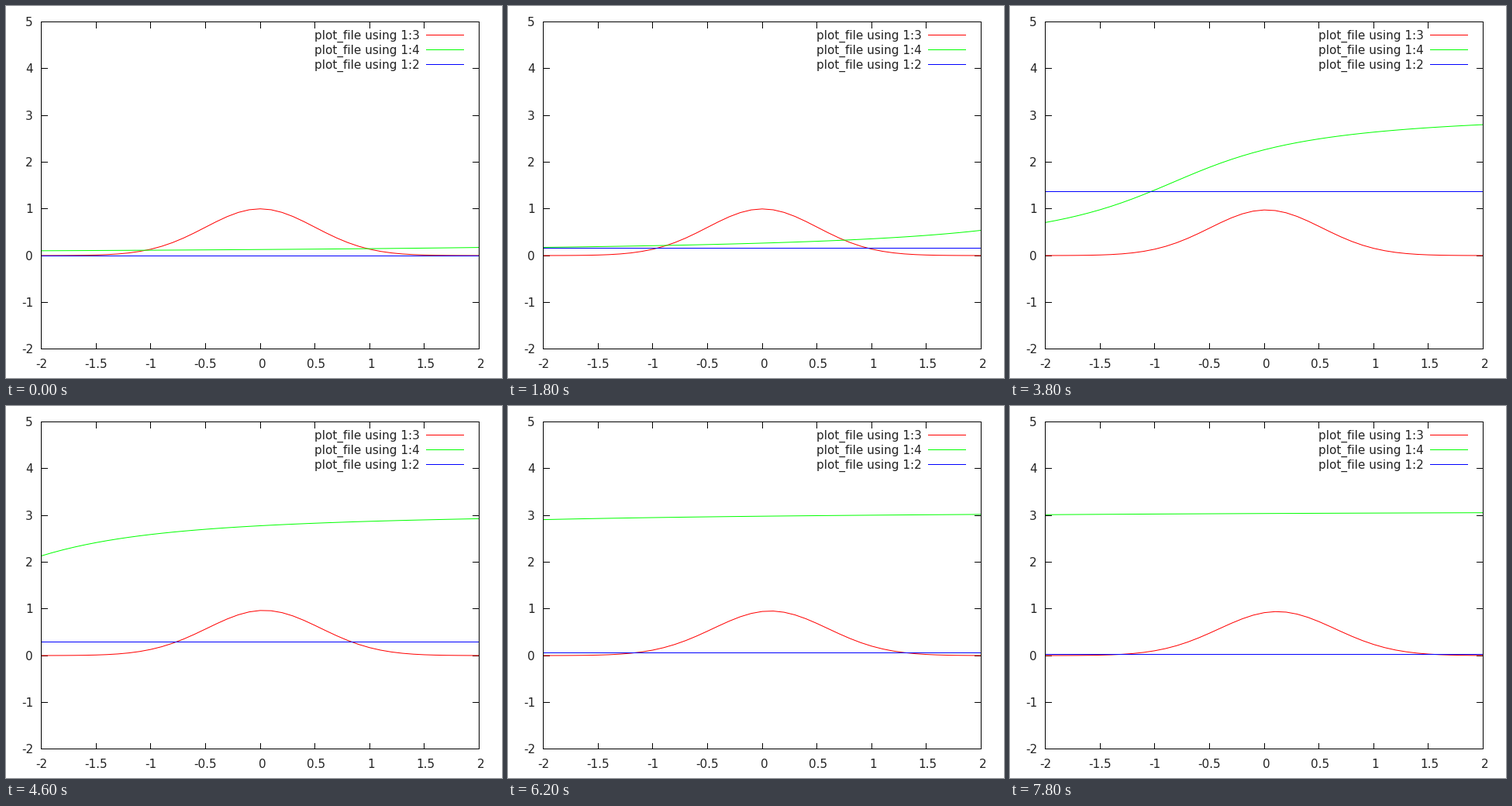
A matplotlib script for the animation above (8000 ms loop, 640x480 px).

```python
import numpy as np
import matplotlib.pyplot as plt
from matplotlib.animation import FuncAnimation

W, H, DPI = 640, 480, 100
FRAMES, STEP_MS = 40, 200
PX = 72 / DPI                      # one pixel in points
LEFT, RIGHT, TOP, BOTTOM = 45, 610, 20, 442
RED, GREEN, BLUE = "#ff0000", "#00ff00", "#0000ff"
INK = "#222222"

plt.rcParams["font.family"] = "DejaVu Sans"
fig = plt.figure(figsize=(W / DPI, H / DPI), dpi=DPI, facecolor="white")
ax = fig.add_axes([0, 0, 1, 1])
ax.set_xlim(0, W)
ax.set_ylim(H, 0)
ax.axis("off")


def px_x(v):
    return LEFT + (v + 2) * (RIGHT - LEFT) / 4


def px_y(v):
    return 321.5 - v * (BOTTOM - TOP) / 7


def nearest(p):
    return int(np.floor(p + 0.5))


def curve(color, z):
    return ax.plot(cols, cols, color=color, lw=PX, zorder=z)[0]


def bar(x0, y0, x1, y1, color="black", z=1):
    """Crisp one-pixel line between two pixels, both included."""
    w, h = x1 - x0 + 1, y1 - y0 + 1
    return ax.add_patch(plt.Rectangle((x0, y0), w, h, fc=color, ec="none",
                                      lw=0, antialiased=False, zorder=z))


def label(x, y, s, ha):
    ax.text(x, y + 6, s, ha=ha, va="baseline", color=INK,
            fontsize=15.3 * PX, zorder=2)


# Ticks lie behind the curves, the border in front
for v in np.arange(-2, 2.1, 0.5):
    c = nearest(px_x(v))
    bar(c, TOP, c, TOP + 8)
    bar(c, BOTTOM - 7, c, BOTTOM)
    label(c + (2.5 if v >= 0 else 0.5), 461, f"{v:g}", "center")

for v in range(-2, 6):
    r = nearest(px_y(v))
    bar(LEFT, r, LEFT + 8, r)
    bar(RIGHT - 8, r, RIGHT, r)
    label(35, r, str(v), "right")

bar(LEFT, TOP, RIGHT, TOP, z=6)
bar(LEFT, BOTTOM, RIGHT, BOTTOM, z=6)
bar(LEFT, TOP, LEFT, BOTTOM, z=6)
bar(RIGHT, TOP, RIGHT, BOTTOM, z=6)

for i, (col, color) in enumerate([(3, RED), (4, GREEN), (2, BLUE)]):
    y = 37 + 19 * i
    label(533.5, y, f"plot_file using 1:{col}", "right")
    bar(542, y, 590, y, color)

x = np.linspace(-2, 2, 41)
cols = px_x(x) + 0.5
packet = curve(RED, 3)
phase = curve(GREEN, 4)
level = bar(LEFT, 0, RIGHT, 0, BLUE, 5)


def detune(n):
    return 7.72 - 0.45 * n


def shift(d):
    return np.arctan2(1, d)


def draw(n):
    d = detune(n)
    delta = shift(d - x)

    # The packet drifts with the accumulated phase and slowly spreads
    drift = 0.00177 * shift(detune(np.arange(n))).sum()
    done = (shift(d) - shift(detune(0))) / np.pi
    amp = 1 - 0.28 * drift - 0.028 * done
    var = 0.25 / amp ** 2
    bump = amp * np.exp(-(x - drift) ** 2 / (2 * var))

    rate = 2.3 / (1 + d * d) if n else 0
    packet.set_ydata(px_y(bump) + 0.5)
    phase.set_ydata(px_y(delta) + 0.5)
    level.set_y(nearest(px_y(rate)))
    return packet, phase, level


anim = FuncAnimation(fig, draw, frames=FRAMES, interval=STEP_MS,
                     init_func=lambda: draw(0), repeat=True,
                     repeat_delay=0, blit=False)
plt.show()
```
